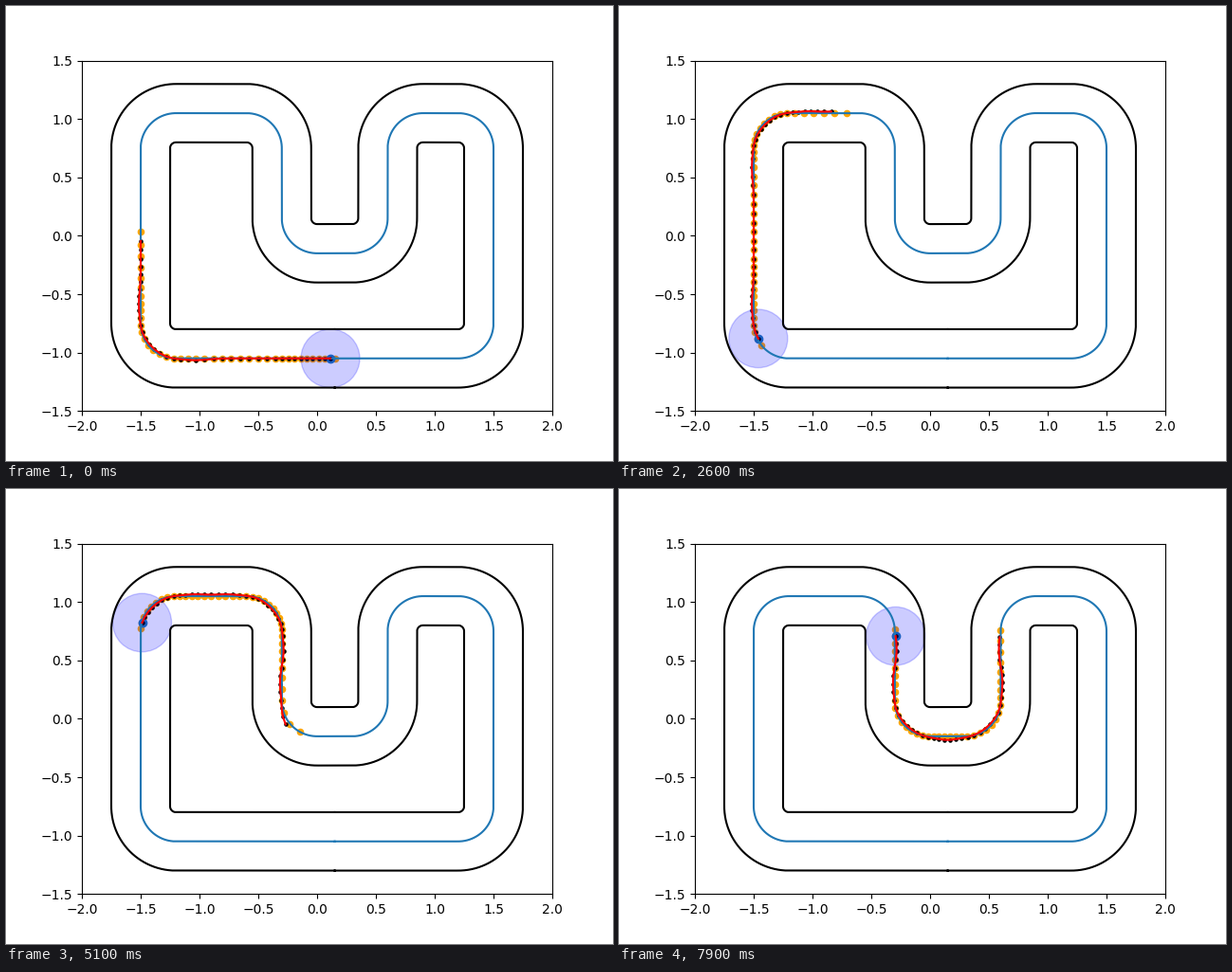
Animation, 640 px wide and 480 px high, one loop 8000 ms. Source, as a matplotlib script:

```python
import numpy as np
import matplotlib.pyplot as plt
from matplotlib.animation import FuncAnimation
from matplotlib.patches import Circle

FRAMES, INTERVAL = 80, 100
HORIZON = 39
RADIUS, HALF_WIDTH = 0.3, 0.25
STRAIGHTS = [1.35, 1.5, 0.6, 0.6, 0.3, 0.6, 0.3, 1.5, 1.05]
TURNS = [-1, -1, -1, 1, 1, -1, -1, -1]
ARC = RADIUS * np.pi / 2

# Progress along the track (step, distance) and how far the guide
# points run ahead of the plan at its end.
PROGRESS = np.array([
    (-6, -0.15), (0, 0.03), (9, 0.50), (18, 1.185), (27, 1.745), (36, 2.30),
    (39, 2.525), (48, 3.24), (51, 3.395), (57, 3.72), (63, 4.03), (68, 4.335),
    (72, 4.55), (79, 4.90), (90, 5.66), (93, 5.82), (102, 6.25), (107, 6.54),
    (118, 7.255), (126, 7.75)])
LEAD = np.array([(0, 0.08), (9, 0.21), (18, 0.18), (26, 0.13), (39, 0.19),
                 (51, 0.13), (68, 0.15), (79, 0.06)])


def build_track(ds=0.001):
    """Integrate straights and quarter arcs into a sampled centre line."""
    heading, start = np.pi, 0.0
    dist, angle, corners = [0.0], [heading], []
    for i, length in enumerate(STRAIGHTS):
        start += length
        dist.append(start)
        angle.append(heading)
        if i < len(TURNS):
            corners.append((start + ARC / 2, TURNS[i]))
            start += ARC
            heading += TURNS[i] * np.pi / 2
            dist.append(start)
            angle.append(heading)
    s = np.linspace(0, start, int(start / ds) + 1)
    h = np.interp(s, dist, angle)
    mid, step = (h[1:] + h[:-1]) / 2, s[1]
    x = 0.15 + np.concatenate([[0], np.cumsum(np.cos(mid) * step)])
    y = -1.05 + np.concatenate([[0], np.cumsum(np.sin(mid) * step)])
    return s, x, y, h, corners


S, X, Y, H, CORNERS = build_track()


def place(s, offset=0.0):
    """Point at distance s, shifted to the left of the driving direction."""
    h = np.interp(s, S, H)
    x = np.interp(s, S, X) + np.minimum(s, 0) * np.cos(h)
    y = np.interp(s, S, Y)
    return x - offset * np.sin(h), y + offset * np.cos(h)


STEPS = np.arange(-6, 126.01, 0.5)
KERNEL = np.array([1, 2, 3, 4, 3, 2, 1]) / 16
PADDED = np.pad(np.interp(STEPS, *PROGRESS.T), 3,
                mode="reflect", reflect_type="odd")
SMOOTH = np.convolve(PADDED, KERNEL, mode="valid")


def progress(step):
    return np.interp(step, STEPS, SMOOTH)


def racing_offset(s, tail):
    """Swing wide around each corner, cut its middle, drift at the plan's end."""
    total = np.zeros_like(s)
    for centre, turn in CORNERS:
        a = s - centre
        wide = 0.016 * np.exp(-((np.abs(a) - 0.4) / 0.14) ** 2)
        cut = 0.013 * np.exp(-(a / 0.15) ** 2)
        drift = 0.045 * tail * np.exp(-(a / 0.2) ** 4)
        total -= turn * (wide - cut + drift)
    return total


def plan(n):
    k = np.arange(HORIZON + 1)
    s = progress(n + k)
    path = place(s, racing_offset(s, np.clip((k - 34) / 5, 0, 1) ** 2))

    lag = progress(n - 1 + k)
    stretch = s[-1] - lag[-1] + np.interp(n, *LEAD.T)
    guide = place(lag + stretch * np.clip((k - 33) / 6, 0, 1) ** 1.4)
    return np.column_stack(path), np.column_stack(guide)


fig, ax = plt.subplots(figsize=(6.4, 4.8), dpi=100)
ax.set_xlim(-2, 2)
ax.set_ylim(-1.5, 1.5)

for side in (-HALF_WIDTH, HALF_WIDTH):
    ax.plot(*place(S, side), color="black")
ax.plot(X, Y, color="tab:blue")

guide_dots = ax.scatter([], [], s=20, color="orange")
car = ax.scatter([], [], s=36, color="tab:blue")
plan_dots = ax.scatter([], [], s=5, color="black")
zone = ax.add_patch(Circle((0, 0), HALF_WIDTH, color="blue", alpha=0.2))
plan_line, = ax.plot([], [], color="red")
for artist in (guide_dots, car, plan_dots, zone):
    artist.set_zorder(1)


def update(n):
    path, guide = plan(n)
    guide_dots.set_offsets(guide)
    plan_dots.set_offsets(path)
    plan_line.set_data(path[:, 0], path[:, 1])
    car.set_offsets(path[:1])
    zone.center = tuple(path[0])
    return guide_dots, car, plan_dots, zone, plan_line


anim = FuncAnimation(fig, update, frames=FRAMES, interval=INTERVAL,
                     repeat=True, repeat_delay=0)
plt.show()
```
